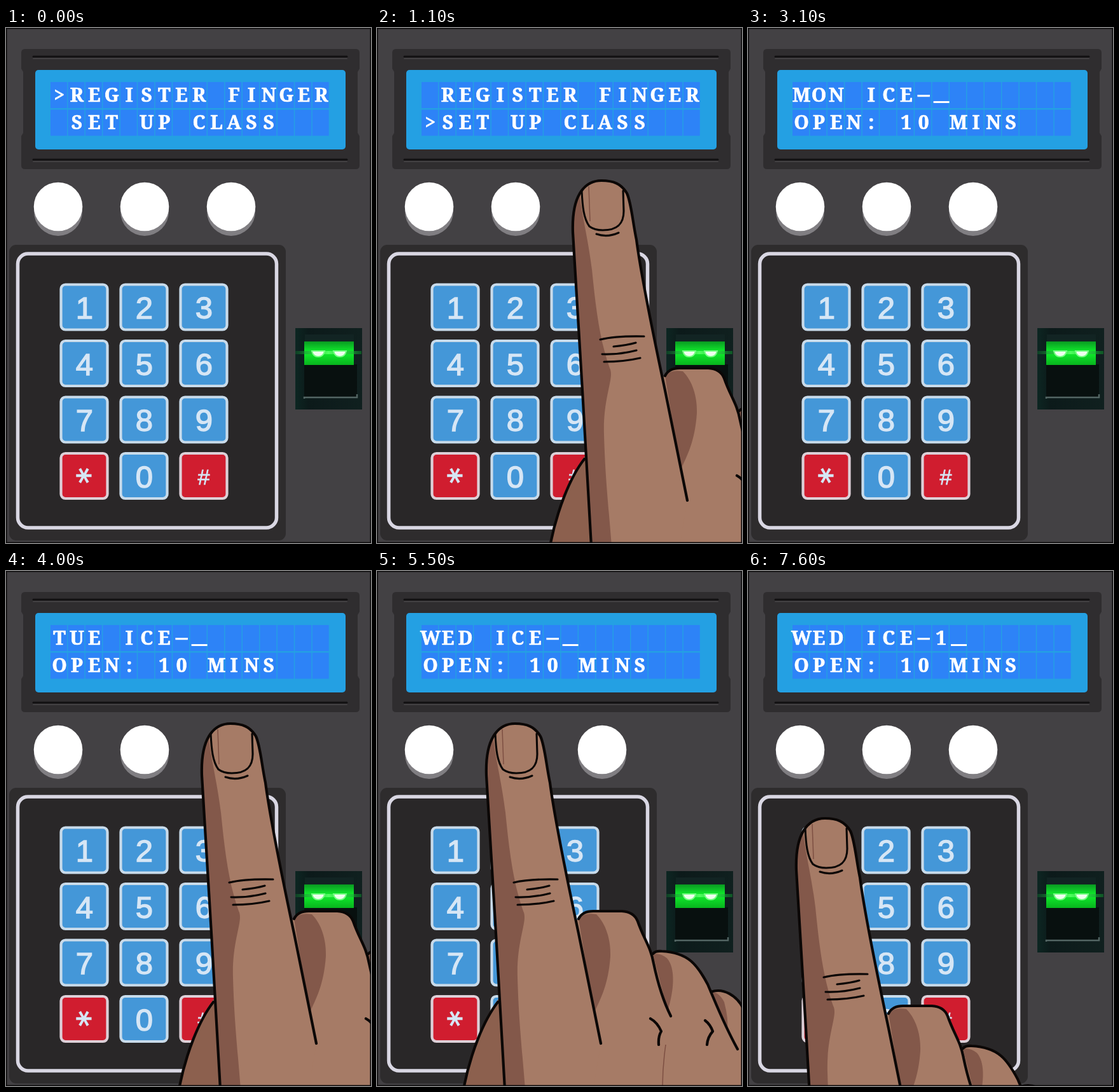
Recreate the animation shown at these times as an HTML page. Size 574 by 810 pixels, loop 8000 ms.

```html
<!DOCTYPE html>
<html lang="en">
<head>
<meta charset="utf-8">
<title>Keypad terminal</title>
<style>
  html, body { margin: 0; width: 100%; height: 100%; overflow: hidden; background: #434144; }
  svg { display: block; width: 574px; height: 810px; }
  text { text-anchor: middle; }
  #lcd text { font: 600 30px "Noto Serif", serif; fill: #fff; stroke: #fff; stroke-width: .7; }
  #lcd .dash { font-size: 37px; }
  #keys text { font: 49px "Liberation Sans", Arial, sans-serif; fill: #d6e6f5; stroke: #d6e6f5; stroke-width: 1.5; }
  #keys .hash { font-size: 34px; stroke-width: .8; }
  #keys .star { font: 50px "DejaVu Sans", sans-serif; }
  .ink { fill: none; stroke: #0b0706; stroke-width: 4.2; stroke-linecap: round; stroke-linejoin: round; }
  .thin { stroke-width: 3.1; }
  .crease { fill: none; stroke: #7d4f42; stroke-width: 1.5; }
  .skin { fill: #a67b66; }
  .shade { fill: #83584a; }
</style>
</head>
<body>
<svg viewBox="0 0 574 810">
  <defs>
    <linearGradient id="glow" x2="0" y2="1">
      <stop offset="0" stop-color="#0a9a22"/>
      <stop offset=".45" stop-color="#10ee2c"/>
      <stop offset="1" stop-color="#08b41e"/>
    </linearGradient>
    <linearGradient id="beam">
      <stop offset="0" stop-color="#0c6a2a" stop-opacity=".4"/>
      <stop offset=".5" stop-color="#4dff5e"/>
      <stop offset="1" stop-color="#0c8a2a" stop-opacity=".5"/>
    </linearGradient>
    <linearGradient id="well">
      <stop offset="0" stop-color="#0d2622"/>
      <stop offset=".2" stop-color="#0c1a1a"/>
      <stop offset="1" stop-color="#10201f"/>
    </linearGradient>
  </defs>

  <rect width="574" height="810" fill="#434144"/>

  <!-- display bezel -->
  <path d="M30 33H550Q556 33 556 39V64L553 69V165L556 170V216Q556 222 550 222H30Q24 222 24 216V170L27 165V69L24 64V39Q24 33 30 33Z" fill="#2f2d2f"/>
  <g fill="none" stroke-linecap="round">
    <path d="M43 48H536M43 210H536" stroke="#434143" stroke-width="2"/>
    <path d="M43 45H536M43 207H536" stroke="#121112" stroke-width="3"/>
  </g>
  <rect x="46" y="66" width="488" height="125" rx="5" fill="#24a0e3"/>
  <g id="cells" fill="#2d83f7"></g>
  <g id="lcd"></g>

  <g id="buttons"></g>

  <!-- keypad -->
  <rect x="5" y="341" width="435" height="465" rx="11" fill="#2e2c2d"/>
  <rect x="18.5" y="355" width="407" height="431" rx="16" fill="#292728" stroke="#d9d7e3" stroke-width="5.5"/>
  <g id="keys"></g>

  <!-- fingerprint reader -->
  <rect x="455" y="472" width="105" height="128" fill="url(#well)"/>
  <rect x="470" y="482" width="77" height="12" fill="#122423"/>
  <rect x="469" y="529" width="83" height="51" fill="#08100f"/>
  <rect x="469" y="493" width="78" height="37" fill="url(#glow)"/>
  <rect x="455" y="508" width="104" height="5" fill="url(#beam)"/>
  <path d="M481 508H501Q499 517 491 517T481 508ZM515 508H535Q533 517 525 517T515 508Z" fill="#efffef" stroke="#74ff82" stroke-width="2"/>
  <path d="M469 583V581H552V576" fill="none" stroke="#536563" stroke-width="2.5"/>

  <g id="hand">
    <path d="M193 671C172 694 148 750 136 815H206Z" fill="#8c604e"/>
    <path class="ink" d="M190 678C168 706 147 758 136 815"/>
    <path class="skin" d="M317 548Q322 535 340 535L385 535Q404 536 410 551L433 605Q436 597 448 598C490 599 503 618 525 662C545 655 566 668 576 688L650 815H200V560Z"/>
    <path class="shade" d="M317 547Q325 537 345 540C360 555 368 580 367 606C364 650 352 672 341 696Z"/>
    <path class="shade" d="M434 603Q445 600 456 609C470 625 467 660 457 692Z"/>
    <path class="shade" d="M525 662Q538 662 546 678Q553 704 551 724Z"/>

    <path class="skin" d="M201 815L187 570L172 322C171 295 174 275 183 260C192 245 204 240 217 240C236 240 248 245 257 260C264 275 266 305 272 333C280 395 300 490 317 570L352 743L340 815Z"/>
    <path class="shade" d="M201 815L187 570L172 322C171 295 174 275 183 260C184 285 196 330 202 380C208 440 214 490 230 535C238 550 219 580 221 640C223 710 228 750 233 815Z"/>
    <path class="crease" d="M197 249L199 304M454 745Q449 780 449 812"/>

    <path class="ink" d="M201 815L187 570L172 322C171 295 174 275 183 260C192 245 204 240 217 240C236 240 248 245 257 260C264 275 266 305 272 333C280 395 300 490 317 570L352 743"/>
    <path class="ink" d="M317 547Q323 535 340 535L385 535Q404 536 410 551C420 580 430 590 435 617C443 655 452 680 462 700"/>
    <path class="ink" d="M434 602Q438 597 448 598C490 600 504 620 520 650C535 685 545 712 567 752M525 662C545 655 566 668 576 688"/>
    <path class="ink thin" d="M186 256C187 280 189 300 198 312Q206 318 219 318C244 318 252 306 252 288L251 256M209 324Q226 330 244 322"/>
    <path class="ink thin" d="M215 490Q240 484 284 485M236 501Q257 499 271 495M218 513Q245 514 272 507M221 525Q252 525 278 519"/>
    <path class="ink" d="M430 704Q441 710 447 724Q442 732 443 745M516 707Q524 713 528 724Q520 733 519 745"/>
  </g>
  <rect x=".5" y=".5" width="573" height="809" fill="none" stroke="#0c0b0c" stroke-width="2"/>
</svg>

<script>
const get = id => document.getElementById(id);

function add(parent, tag, attrs, text = '') {
  const el = document.createElementNS('http://www.w3.org/2000/svg', tag);
  for (const name in attrs) el.setAttribute(name, attrs[name]);
  el.textContent = text;
  parent.append(el);
}

const lcd = get('lcd'), hand = get('hand'), keys = get('keys');
const PITCH = 27.45;

for (let row = 0; row < 2; row++)
  for (let col = 0; col < 16; col++)
    add(get('cells'), 'rect', { x: 70 + col * PITCH, y: 85 + row * 43.5, width: 26, height: 41 });

for (const x of [82, 218, 354]) {
  add(get('buttons'), 'circle', { cx: x, cy: 289, r: 38, fill: '#807e82' });
  add(get('buttons'), 'circle', { cx: x, cy: 281, r: 38.3, fill: '#fff' });
}

[...'123456789*0#'].forEach((label, i) => {
  const x = 85 + i % 3 * 94, y = 402 + Math.floor(i / 3) * 88.5;
  const digit = label >= '0' && label <= '9';
  add(keys, 'rect', { x: x + 1.5, y: y + 1.5, width: 73, height: 71, rx: 7,
    fill: digit ? '#4497d8' : '#d01d2f', stroke: digit ? '#c9dbea' : '#ddd0d8', 'stroke-width': 4.2 });
  if (digit) add(keys, 'text', { x: x + 38.5, y: y + 55 }, label);
  else if (label === '#') add(keys, 'text', { class: 'hash', x: x + 38, y: y + 50 }, label);
  else add(keys, 'text', { class: 'star', x: 0, y: 25.5, transform: `translate(${x + 37} ${y + 36.5}) rotate(90)` }, label);
});

function show(lines) {
  lcd.replaceChildren();
  lines.forEach((line, row) => [...line].forEach((ch, col) => {
    const x = 84 + col * PITCH, y = 116 + row * 43;
    if (ch === '_') add(lcd, 'rect', { x: x - 12, y: y - 1, width: 25, height: 3, fill: '#fff' });
    else if (ch === '-') add(lcd, 'text', { x, y, class: 'dash' }, '–');
    else if (ch !== ' ') add(lcd, 'text', { x, y }, ch);
  }));
}

const OPEN = 'OPEN: 10 MINS';
const screens = [
  [0, ['>REGISTER FINGER', ' SET UP CLASS']],
  [1000, [' REGISTER FINGER', '>SET UP CLASS']],
  [2000, ['MON ICE-_', OPEN]],
  [4000, ['TUE ICE-_', OPEN]],
  [4800, ['WED ICE-_', OPEN]],
  [7500, ['WED ICE-1_', OPEN]]
];

// hand offsets from the middle button
const RIGHT = [136, 0], MIDDLE = [0, 0], KEY = [-96, 149];
const poses = [[0, null], [1000, RIGHT], [2000, MIDDLE], [2500, null],
  [4000, RIGHT], [5500, MIDDLE], [6000, null], [7500, KEY]];

const at = (steps, t) => steps.findLast(([start]) => start <= t)[1];

let shown;
function frame(now) {
  const t = now % 8000, screen = at(screens, t), pose = at(poses, t);
  if (screen !== shown) show(shown = screen);
  hand.style.display = pose ? '' : 'none';
  if (pose) hand.setAttribute('transform', `translate(${pose})`);
  requestAnimationFrame(frame);
}
frame(0);
</script>
</body>
</html>
```
